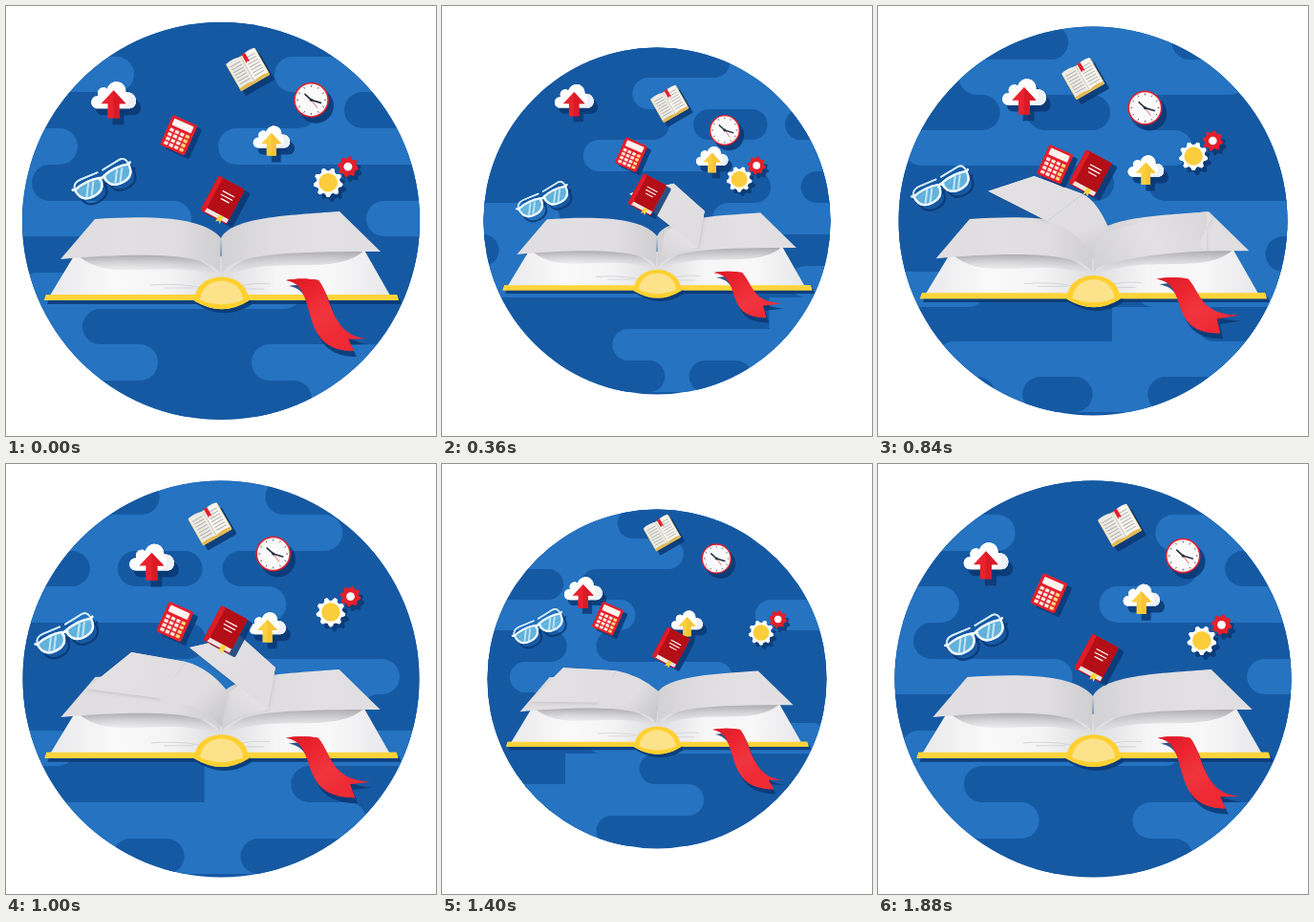
Write an HTML page with a canvas that moves like this. It is 450x450 px and loops after 1.92 s.

```html
<!DOCTYPE html>
<html lang="en">
<head>
<meta charset="utf-8">
<title>Open book</title>
<style>
html, body { margin: 0; width: 100%; height: 100%; overflow: hidden; background: #fff; }
canvas { display: block; width: 450px; height: 450px; }
</style>
</head>
<body>
<canvas id="stage"></canvas>
<script>
const LOOP = 1920, STEP = 40, MID = 225, TAU = Math.PI * 2;
const DARK = '#1659a3', LIGHT = '#2573c1', RED = '#e3202c', GOLD = '#ffd43b';
const SHADE = 'rgba(10,56,114,.85)';
const canvas = document.getElementById('stage');
const g = canvas.getContext('2d');
const dpr = window.devicePixelRatio || 1;
canvas.width = canvas.height = 450 * dpr;
let zoom = 1;

const lerp = (a, b, k) => a + (b - a) * k;
// Nearest height that falls on a whole device pixel.
const snap = y => (Math.round((MID + (y - MID) * zoom) * dpr) / dpr - MID) / zoom + MID;

function fill(path, color) { g.fillStyle = color; g.fill(path); }
function stroke(path, color, width) {
  g.strokeStyle = color;
  g.lineWidth = width;
  g.lineCap = g.lineJoin = 'round';
  g.stroke(path);
}
function shape(d, color) { fill(new Path2D(d), color); }
function line(d, color, width) { stroke(new Path2D(d), color, width); }
function box(x, y, w, h, r, color) {
  const p = new Path2D();
  p.roundRect(x, y, w, h, r);
  fill(p, color);
}
function disc(x, y, r, color) {
  const p = new Path2D();
  p.arc(x, y, r, 0, TAU);
  fill(p, color);
}
function cast(x, y, draw) {
  g.save();
  g.shadowColor = SHADE;
  g.shadowOffsetX = x * zoom * dpr;
  g.shadowOffsetY = y * zoom * dpr;
  draw();
  g.restore();
}
function fade(x0, y0, x1, y1, ...colors) {
  const f = g.createLinearGradient(x0, y0, x1, y1);
  colors.forEach((c, i) => f.addColorStop(i / (colors.length - 1), c));
  return f;
}

// Backdrop: rows alternate dark bars on light and light bars on dark.
const TILE = 456, ROW = 37.7, TOP = 15;
const rows = [
  [[53, 398]], [[281, 590]], [[8, 325], [354, 443]], [[222, 531]], [[27, 447]], [[377, 650]],
  [[153, 577]], [[470, 766]], [[80, 445]], [[257, 615]], [[27, 320], [349, 424]]
];
function backdrop(t) {
  const shift = TILE * t / LOOP;
  g.fillStyle = DARK;
  g.fillRect(0, 0, 450, 450);
  rows.forEach((bars, i) => {
    const y = snap(TOP + ROW * i), h = snap(TOP + ROW * (i + 1)) - y;
    const even = i % 2 === 0;
    g.fillStyle = even ? LIGHT : DARK;
    g.fillRect(0, y, 450, h);
    const r = h / 2, radii = i === 8 ? [r, 0, 0, r] : r;
    for (const [a, b] of bars)
      for (let k = -2; k < 3; k++)
        box(a - shift + k * TILE, y, b - a, h, radii, even ? DARK : LIGHT);
  });
}

// Turning page: bend top, corner top, corner bottom, bend bottom, spine top, spine bottom.
const FLIP = 680, FIRST = 40, SPAN = 160;
const poses = [
  [347, 215, 352, 222, 338, 251, 346, 257, 226, 243, 226, 277],
  [282, 213, 245, 180, 192, 192, 274, 257, 234, 240, 228, 276],
  [214, 196, 162, 177, 113, 193, 176, 225, 242, 233, 231, 276],
  [188, 207, 131, 197, 84, 235, 160, 245, 232, 238, 226, 276],
  [165, 221, 93, 223, 57, 265, 145, 260, 225, 243, 223, 275]
];
function poseAt(age) {
  const u = Math.max(0, (age - FIRST) / SPAN), i = Math.min(3, Math.floor(u)), k = u - i;
  const at = n => poses[Math.max(0, Math.min(4, n))];
  return poses[0].map((_, j) => {
    const [a, b, c, d] = [i - 1, i, i + 1, i + 2].map(n => at(n)[j]);
    return b + .5 * k * (c - a + k * (2 * a - 5 * b + 4 * c - d + k * (3 * (b - c) + d - a)));
  });
}
function turningPage(age) {
  if (age < FIRST || age >= FLIP) return;
  const [ax, ay, bx, by, cx, cy, dx, dy, tx, ty, sx, sy] = poseAt(age);
  const side = Math.max(-1, Math.min(1, (ax - 226) / 50));
  const free = `M${ax},${ay} L${bx},${by} L${cx},${cy} L${dx},${dy} Z`;
  const root = `M${tx},${ty} Q${lerp(tx, ax, .45)},${lerp(ty, ay, .8)} ${ax},${ay}
    L${dx},${dy} Q${lerp(sx, dx, .3)},${lerp(sy, dy, .8)} ${sx},${sy} Z`;
  g.save();
  g.shadowColor = 'rgba(70,70,80,.22)';
  g.shadowBlur = 4 * dpr;
  g.shadowOffsetY = dpr;
  shape(free, '#dfdee0');
  g.restore();
  shape(root, side > 0
    ? fade(sx, sy, ax, ay, '#d2d1d3', '#e3e1e3', '#d8d6d9')
    : fade(ax, ay, tx + 3, sy - 18, '#dfdde0', '#e0dee0', '#cac9cb'));
  shape(free, fade(bx, by, ax, ay, '#e2e0e2', '#dfdde0'));
}

// Tail of the bookmark: time, upper tip, lower tip.
const tail = [
  [0, 378, 348, 364, 361], [360, 374, 324, 356, 341], [680, 377, 322, 370, 342],
  [840, 380, 326, 361, 345], [1160, 382, 340, 370, 354], [1400, 381, 349, 368, 360],
  [1920, 378, 348, 364, 361]
];
function ribbon(t) {
  const n = tail.findIndex(k => k[0] > t), a = tail[n - 1], b = tail[n];
  const [, ux, uy, lx, ly] = a.map((v, j) => lerp(v, b[j], (t - a[0]) / (b[0] - a[0])));
  const d = `M293,287 C330,292 302,${ly} ${lx},${ly}
    L${(ux + lx) / 2 - 13},${(uy + ly) / 2 - 6} L${ux},${uy}
    C340,${uy - 2} 341,304 327,287 C316,285 304,285 293,287 Z`;
  cast(3, 6, () => shape(d, RED));
  shape(d, fade(300, 285, 345, 345, '#dd1b27', '#ec2530', '#f0353f', '#ee2a34'));
}

function book(t) {
  const spine = 'M197,308.5 C198,275 253,275 254,308.5 Q226,326 197,308.5 Z';
  cast(3, 4, () => {
    shape('M42,302 H409 L411,308 H40 Z', GOLD);
    shape(spine, GOLD);
  });
  // lower sheets
  shape('M72,260 C110,246 190,246 225,262 V303 H46 Z',
    fade(58, 0, 226, 0, '#ececee', '#fafafa', '#f4f4f5', '#dedee0'));
  shape('M373,252 C330,246 260,246 225,262 V303 H402 Z',
    fade(225, 0, 400, 0, '#dedee0', '#f6f6f7', '#f8f8f9', '#e8e8ea'));
  line('M152,292 Q180,290 201,294 M166,295 H196 M240,294 Q257,289 276,291 M246,296 H270', '#cfcfd2', .8);
  // soft shade under the raised sheets
  shape('M76,262 C112,292 170,262 224,284 Q200,245 76,262 Z',
    fade(0, 260, 0, 282, 'rgba(90,90,98,.5)', 'rgba(180,180,185,0)'));
  shape('M377,254 C345,286 280,258 227,284 Q250,246 377,254 Z',
    fade(0, 256, 0, 282, 'rgba(90,90,98,.5)', 'rgba(180,180,185,0)'));
  // upper sheets
  shape('M93,223 C140,220 205,218 225,243 L224,280 C212,258 140,258 57,265 Z',
    fade(80, 0, 226, 0, '#e0dee0', '#e1dfe1', '#dfdde0', '#cfced0'));
  shape('M349,215 C295,219 236,221 225,243 L226,280 C240,258 300,257 392,257 Z',
    fade(225, 0, 385, 0, '#d2d1d3', '#dfdde0', '#e2e0e2', '#e0dee0'));
  for (const start of [160, 480, 800]) turningPage(t - start);
  // cover and spine
  shape('M42,302 H409 L411,308 H40 Z', GOLD);
  shape(spine, '#ffd02f');
  shape('M203,307.5 C205,281 246,281 248,307.5 Q226,317 203,307.5 Z', '#fce28a');
  ribbon(t);
}

function clock() {
  cast(5, 6, () => disc(0, 0, 18.4, RED));
  disc(0, 0, 16.8, '#fafafa');
  for (let i = 0; i < 12; i++) {
    const c = Math.cos(i * TAU / 12), s = Math.sin(i * TAU / 12);
    line(`M${c * 14},${s * 14} L${c * 15},${s * 15}`, '#4b5566', 1);
  }
  line('M0,0 L6,8', RED, .7);
  line('M-6.5,-6 L0,0 L10,3', '#26303e', 1.7);
  disc(0, 0, 1.6, '#26303e');
}

function calculator() {
  g.rotate(.42);
  cast(5, 4, () => box(-14, -17, 28, 34, 2, RED));
  box(-14, -17, 28, 34, 2, RED);
  box(-11, -14.5, 22, 7.5, 1, '#fff4ef');
  for (let i = 0; i < 16; i++)
    box(-11 + i % 4 * 5.9, -4 + (i >> 2) * 5, 4.4, 3.5, .6, i % 4 === 3 ? '#ffd37a' : '#ffe6dc');
}

function redBook() {
  g.rotate(.49);
  cast(6, 4, () => box(-15.5, -20, 31, 41, 2, RED));
  box(-15.5, -20, 31, 41, 2, '#d01722');
  box(-12, 15, 27, 5, 1, '#f4efe8');
  line('M-11,17.5 H14', '#d5ccc3', .6);
  box(-15.5, -20, 31, 35.5, 2, '#b40e16');
  box(-15.5, -20, 5, 40, 2, '#de1c27');
  line('M-4,-8 H9 M-4,-4 H9 M-2,0 H7', '#fff', 1.2);
  shape('M4,15.5 H9 V24 L6.5,21.5 L4,24 Z', GOLD);
}

function openBook() {
  g.rotate(-.52);
  cast(5, 5, () => box(-17.5, -15.5, 35, 32, 1, '#e2ba55'));
  box(-17.5, -15.5, 35, 32, 1, '#e2ba55');
  shape('M-17,-16 Q-8,-18 0,-15 V14 Q-8,11.5 -17,13.5 Z', '#eceae4');
  shape('M17,-16 Q8,-18 0,-15 V14 Q8,11.5 17,13.5 Z', '#f8f6f1');
  for (let i = 0; i < 7; i++) {
    const y = -11 + i * 3.4;
    line(`M-14.5,${y} H-3 M3,${y} H14.5`, '#a9aaa8', .9);
  }
  line('M0,-15 V14', '#c9c4b8', .8);
  shape('M2,-16.5 H6 V-6 L4,-8 L2,-6 Z', RED);
}

function cloud(arrow, dark) {
  const d = 'M-16,9 C-26,9 -25,-5 -16,-4 C-19,-13 -8,-15 -7,-11 C-3,-23 13,-21 13,-8 C26,-9 27,9 16,9 Z';
  const head = 'M0,-10 L13,4 H6 V19 H-6 V4 H-13 Z';
  cast(5, 7, () => { shape(d, '#fff'); shape(head, arrow); });
  shape(d, '#fff');
  shape('M13,-8 C26,-9 27,9 16,9 H5 C17,7 18,-1 13,-8 Z', '#edf1f5');
  shape(head, arrow);
  shape('M0,-10 L13,4 H6 V19 H0 Z', dark);
}

function gear(x, y, r, color, core, hole, teeth) {
  const p = new Path2D();
  for (let i = 0; i < teeth * 4; i++) {
    const a = (i + .5) * TAU / (teeth * 4), q = i % 4 < 2 ? r : r * .8;
    p.lineTo(x + q * Math.cos(a), y + q * Math.sin(a));
  }
  p.closePath();
  cast(4, 5, () => fill(p, color));
  fill(p, color);
  disc(x, y, hole, core);
}
function gears() {
  gear(0, 0, 15.3, '#fff', '#fbcd3c', 9.8, 9);
  gear(20.7, -16.5, 10.8, RED, '#fff', 4.4, 8);
}

function glasses() {
  g.rotate(-.45);
  const lens = x => `M${x - 14},-4 Q${x},-8 ${x + 14},-4 Q${x + 14},10 ${x},10 Q${x - 14},10 ${x - 14},-4 Z`;
  const frame = new Path2D(lens(-16) + lens(16) + 'M-3,-2 Q0,-5 3,-2 M-30,-4 L-32,-5 M30,-4 L32,-5');
  const arms = 'M-30,-4 Q-29,-11 -21,-11 L-2,-10 M30,-4 Q30,-12 24,-12 L4,-10';
  cast(5, 6, () => { stroke(frame, '#e8f6fc', 2.2); line(arms, '#d4ecf7', 1.7); });
  fill(frame, 'rgba(112,195,232,.85)');
  line('M-22,7 L-15,-4 M-17,8 L-10,-3 M10,7 L17,-4 M15,8 L22,-3', 'rgba(225,246,255,.75)', 2);
  line(arms, '#d4ecf7', 1.7);
  stroke(frame, '#f2fbff', 2.2);
}

// Each item circles its own centre: x, y, radius, starting angle, size, drawing.
const items = [
  [132.5, 99, 20, 182, 1, () => cloud('#ea222e', '#d91b26')],
  [233, 65.5, 20, 2, 1, openBook],
  [299.5, 97.3, 20, 3, 1, clock],
  [276.7, 156, 15, -86, .82, () => cloud('#fbcf3f', '#f6c437')],
  [337.7, 169.7, 15, 92, 1, gears],
  [179.6, 150.2, 15, -86, 1, calculator],
  [82, 182, 20, 2, 1.04, glasses],
  [227.4, 187.6, 15, 92, 1, redBook]
];

function draw(t) {
  zoom = (192.5 + 15.5 * Math.cos(TAU * t / 960)) / 208;
  g.setTransform(dpr, 0, 0, dpr, 0, 0);
  g.fillStyle = '#fff';
  g.fillRect(0, 0, 450, 450);
  g.save();
  g.translate(MID, MID);
  g.scale(zoom, zoom);
  g.translate(-MID, -MID);
  g.save();
  g.beginPath();
  g.arc(MID, MID, 208, 0, TAU);
  g.clip();
  backdrop(t);
  g.restore();
  book(t);
  for (const [x, y, r, start, size, paint] of items) {
    const a = start * Math.PI / 180 + TAU * t / LOOP;
    g.save();
    g.translate(x + r * Math.cos(a), y + r * Math.sin(a));
    g.scale(size, size);
    paint();
    g.restore();
  }
  g.restore();
}

const began = performance.now();
function tick() {
  const t = (performance.now() - began) % LOOP;
  draw(Math.floor(t / STEP) * STEP);
  requestAnimationFrame(tick);
}
tick();
</script>
</body>
</html>
```
